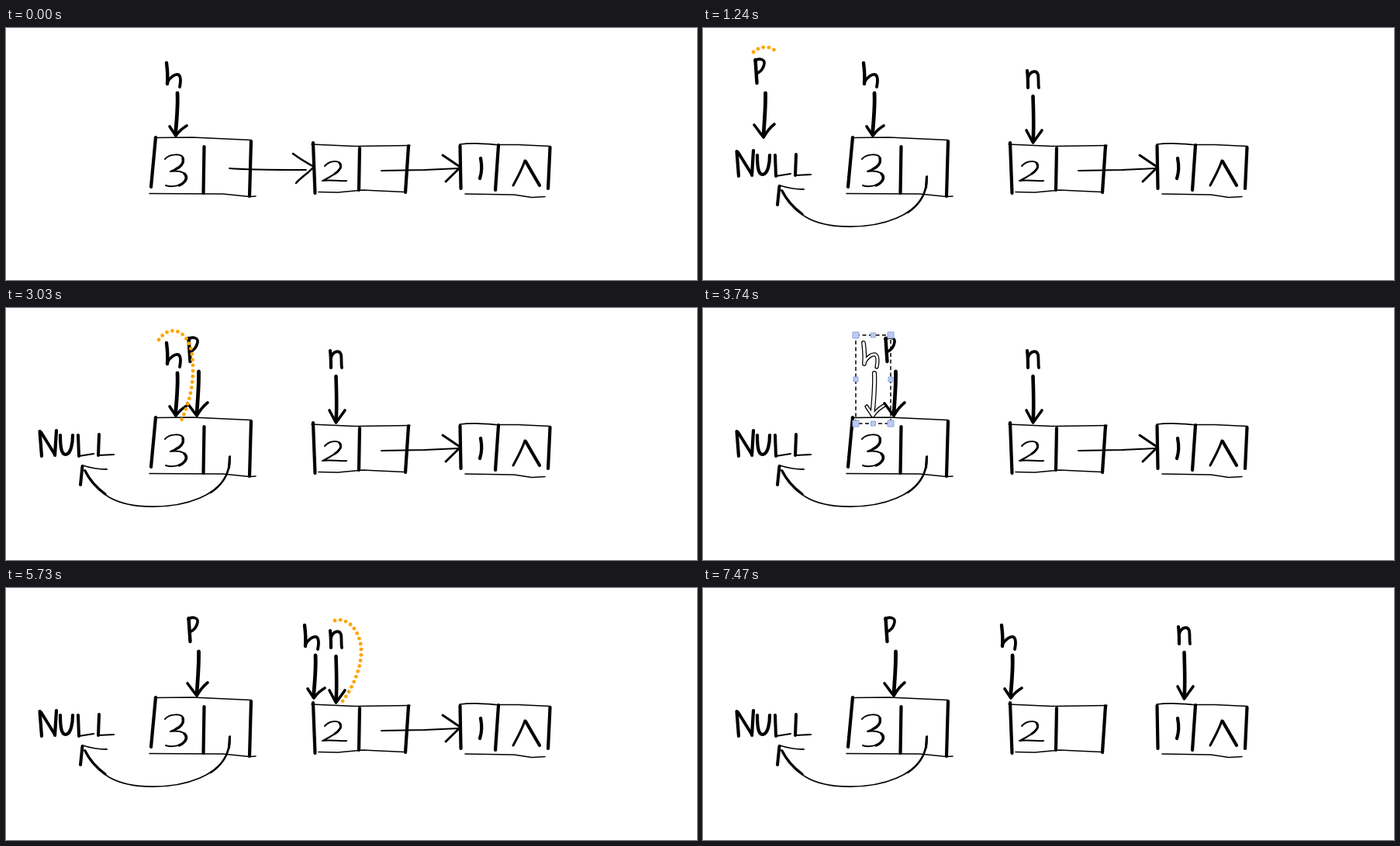
An HTML page with a canvas for the animation above (8000 ms loop, 891x325 px).

```html
<!DOCTYPE html>
<html lang="en">
<head>
<meta charset="utf-8">
<title>Reversing a linked list</title>
<style>
  html, body { margin: 0; width: 100%; height: 100%; overflow: hidden; background: #fff; }
  canvas { display: block; }
</style>
</head>
<body>
<canvas id="stage" width="891" height="325"></canvas>
<script>
const ctx = document.getElementById('stage').getContext('2d');
const LOOP = 8000;
const STEP = 78;

// A stroke is a pen width and a path.
const pen = (width, d) => ({ width, path: new Path2D(d) });

const nodes = [
  // node 3
  pen(4.2, 'M193 141L187 205M255.5 153L254.5 213M316 146L314 217'),
  pen(1.6, 'M192 141.5L240 141L316 144.5M185 213.5L280 214L314 217.5L322 217'),
  pen(2, 'M205 169C211 162 227 161 229 169C230 177 220 182 212 185C226 183 235 188 233 195C230 203 214 206 206 203'),
  pen(3.4, 'M228 168C230 175 224 180 219 182M230 188C235 193 231 200 223 203'),
  // node 2
  pen(4.2, 'M396 148L398.5 213M456 155L455 209M519 152L515 212'),
  pen(1.6, 'M394 150L450 152.5L521 151.5M403 211.5L428 212L460 209L514 211.5'),
  pen(2, 'M411 178C418 170 432 170 432 178C429 187 416 193 408 197C418 195 428 198 439 197'),
  pen(3, 'M430 174C434 179 430 184 424 188'),
  // node 1
  pen(4.2, 'M585.5 152L586.5 207M635 151L631 209M701.5 154L699 207M612 168C614 178 613 188 611 194M670 172L688 203'),
  pen(1.6, 'M585 150C600 148 612 149 632 150.5L660 150.5L702 152.5M592 214L655 215L678 218.5L695 217.5'),
  pen(3, 'M654 203C660 192 666 181 669 171')
];

const link32 = [
  pen(1.8, 'M288 181C310 183 350 183 387 183'),
  pen(2.5, 'M370 162C378 168 388 174 397 179C390 187 380 193 374 200')
];
const link21 = [
  pen(1.8, 'M484 184L540 183L584 181'),
  pen(3, 'M563 164L586 179.5L567 198')
];
const nullWord = [
  [pen(4.2, 'M43.5 159L46 191M65 158L63 190'), pen(4, 'M45 160L63 189')],
  [pen(4.2, 'M70 164C70 178 71 189 77 189C84 188 86 174 86 164')],
  [pen(4, 'M93 164L94 191M120 163L119 190'), pen(2.2, 'M94 191L113 188M119 190L139 189')]
];
const arcShaft = [
  pen(1.7, 'M289 191C290 212 280 232 250 245C215 260 160 260 133 244C117 234 107 223 101 209'),
  pen(3.2, 'M288.5 192L287.5 206M128 240C117 232 108 222 102 210'),
  pen(2.4, 'M287 206C284 220 276 230 264 238')
];
const arcHead = [pen(4, 'M98.5 204L96 228'), pen(1.8, 'M99 203C108 206 120 208 130 208')];

// Movable pointers: moves are [time, dx, dy], hollow and boxed are [from, to] spans,
// lasso keys are [time, share drawn].
const letterP = [pen(4.4, 'M67.5 41L69.5 71'), pen(3.6, 'M67 42C73 38 80 41 79 46C78 53 73 57 69 59')];
const arrowP = [pen(4.8, 'M80.5 84C81 100 79 122 78 139'), pen(3.6, 'M66 125C70 130 74 136 78 141C82 134 87 128 92 124')];

const pointers = [
  {
    ink: [...letterP, ...arrowP],
    box: [56, 31, 45, 117],
    moves: [[230, 0, 0], [1470, 150, -2], [1630, 160, -2], [1710, 168, -2]],
    hollow: [[1400, 2170]],
    boxed: [[1470, 2170]],
    lasso: 'M65 31C76 21 92 23 98 36C106 60 106 105 95 135C84 150 62 148 56 125C52 95 54 60 62 36',
    keys: [[1160, .03], [1240, .13], [1390, 1], [1470, 1]]
  },
  {
    ink: [
      pen(4.4, 'M207 45C208 53 209 62 208 72'),
      pen(3.8, 'M208 70C212 63 218 59 222 60C226 62 225 71 224 76'),
      pen(4.8, 'M221 84C222 100 220 120 218.5 137'),
      pen(3.6, 'M211 127L219 139C223 133 228 129 233 126')
    ],
    box: [197, 35, 45, 114],
    moves: [[0, 0, 0], [4270, 62, 1], [4340, 135, 2], [4420, 178, 3]],
    hollow: [[3270, 4730]],
    boxed: [[3740, 4730]],
    lasso: 'M197 41C210 22 232 26 239 55C244 85 240 115 226 145C214 156 194 154 187 130C182 100 184 65 197 41',
    keys: [[2170, .03], [2950, .49], [3030, .52], [3180, .53], [3340, .97], [3550, .97], [3580, 1], [3740, 1]]
  },
  {
    ink: [
      pen(4.2, 'M418 55C419 62 419 70 419 77'),
      pen(3.8, 'M419 64C422 55 430 54 432 60C433 66 432 72 433 77'),
      pen(4.6, 'M425.5 88C426 105 427 130 425.5 146'),
      pen(3.6, 'M417 132L425.5 148L437 132')
    ],
    box: [404, 42, 44, 115],
    moves: [[380, -315, -5], [620, 0, 0], [7010, 40, -1], [7090, 110, -3], [7170, 170, -4], [7240, 195, -5]],
    hollow: [[450, 780], [5900, 7470]],
    boxed: [[450, 780], [6940, 7470]],
    lasso: 'M424 42C440 37 456 54 458 78C459 104 446 130 434 146C424 156 411 146 409 128C408 104 412 80 419 58',
    keys: [[4730, .01], [5500, .46], [6370, .9], [6600, .97], [6740, 1], [6940, 1]]
  }
];

for (const p of pointers) {
  p.track = document.createElementNS('http://www.w3.org/2000/svg', 'path');
  p.track.setAttribute('d', p.lasso);
}

const within = (spans, t) => spans.some(([from, to]) => t >= from && t < to);

function draw(strokes, color = '#000', extra = 0) {
  ctx.strokeStyle = color;
  for (const s of strokes) {
    ctx.lineWidth = s.width + extra;
    ctx.stroke(s.path);
  }
}

function drawBox([x, y, w, h]) {
  ctx.save();
  ctx.strokeStyle = '#000';
  ctx.lineWidth = 1.5;
  ctx.lineCap = 'butt';
  ctx.setLineDash([5, 3.5]);
  ctx.strokeRect(x, y, w, h);
  ctx.setLineDash([]);
  ctx.lineWidth = 1;
  ctx.fillStyle = '#bccbf2';
  ctx.strokeStyle = '#8ea5dc';
  for (const i of [0, .5, 1]) for (const j of [0, .5, 1]) {
    if (i === .5 && j === .5) continue;
    const r = i === .5 || j === .5 ? 3 : 4;
    ctx.beginPath();
    ctx.rect(x + i * w - r, y + j * h - r, 2 * r, 2 * r);
    ctx.fill();
    ctx.stroke();
  }
  ctx.restore();
}

function drawPointer(p, t) {
  const move = p.moves.findLast(m => t >= m[0]);
  if (!move) return;
  ctx.save();
  ctx.translate(move[1], move[2]);
  const hollow = within(p.hollow, t);
  draw(p.ink, '#000', hollow ? 1.4 : 0);
  if (hollow) draw(p.ink, '#fff', -1.1);
  if (within(p.boxed, t)) drawBox(p.box);
  ctx.restore();
}

function drawLasso({ track, keys }, t) {
  const start = keys[0][0];
  if (t < start || t >= keys.at(-1)[0]) return;
  const now = t >= keys.at(-2)[0] ? t : start + Math.floor((t - start) / STEP) * STEP;
  const k = keys.findLastIndex(key => now >= key[0]);
  const [[t0, a], [t1, b]] = [keys[k], keys[k + 1]];
  const reach = track.getTotalLength() * (a + (b - a) * (now - t0) / (t1 - t0));
  ctx.fillStyle = '#ffa500';
  for (let d = 0; d <= reach; d += 7.2) {
    const { x, y } = track.getPointAtLength(d);
    ctx.beginPath();
    ctx.arc(x, y, 2.4, 0, 7);
    ctx.fill();
  }
}

function render(t) {
  ctx.fillStyle = '#fff';
  ctx.fillRect(0, 0, 891, 325);
  ctx.lineCap = ctx.lineJoin = 'round';
  draw(nodes);
  if (t < 780) draw(link32);
  if (t < 7470) draw(link21);
  if (t >= 90 && t < 230) draw(letterP);
  if (t >= 160 && t < 230) draw(arrowP);
  nullWord.forEach((part, i) => { if (t >= 160 + 70 * i) draw(part); });
  if (t >= 980) draw(arcShaft);
  if (t >= 1060) draw(arcHead);
  for (const p of pointers) drawPointer(p, t);
  for (const p of pointers) drawLasso(p, t);
}

const begin = performance.now();
function tick() {
  render((performance.now() - begin) % LOOP);
  requestAnimationFrame(tick);
}
tick();
</script>
</body>
</html>
```
